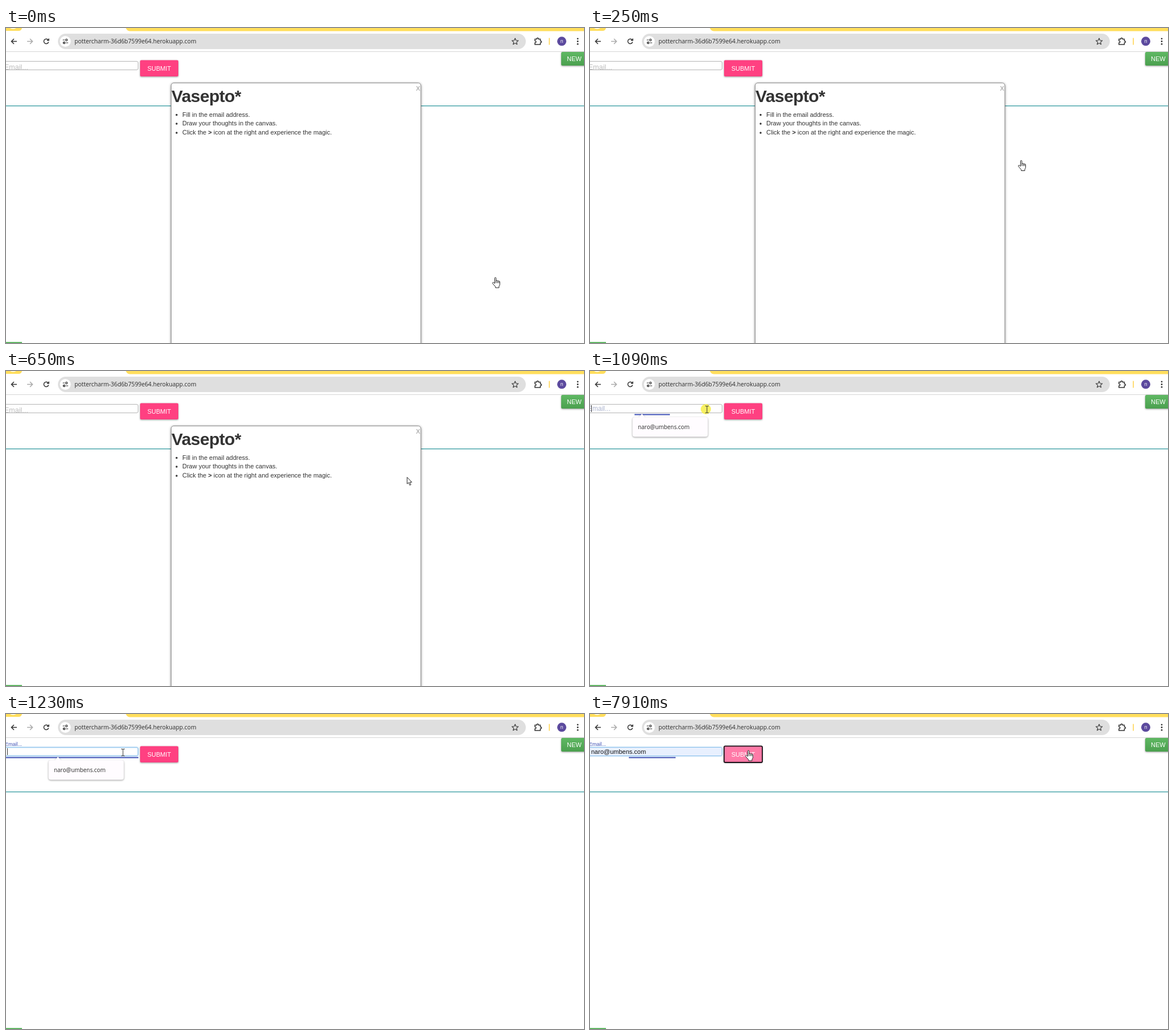
Write an HTML page that moves like this. It is 1013x553 px and loops after 8000 ms.

```html
<!DOCTYPE html>
<html lang="en">
<head>
<meta charset="utf-8">
<title>Email form</title>
<style>
  html, body { margin: 0; width: 100%; height: 100%; overflow: hidden; background: #fff; }
  svg { display: block; }
  text { font: 11px "Liberation Sans", Arial, sans-serif; fill: #333; }
  .ui { font: 10.3px "Open Sans", sans-serif; fill: #2b2b2b; }
  .white { fill: #fff; }
  .icon { fill: none; stroke: #333; stroke-width: 1.5; }
  .label { fill: #3f51b5; font-size: 9px; }
  .line { fill: #3f51b5; }
  .soft { filter: drop-shadow(0 1px 1.5px #0006); }
</style>
</head>
<body>
<svg width="1013" height="553" viewBox="0 0 1013 553">
  <defs>
    <linearGradient id="green" x2="0" y2="1">
      <stop stop-color="#5fb863"/><stop offset="1" stop-color="#4ba04f"/>
    </linearGradient>
    <clipPath id="buttonClip"><rect x="235" y="56.5" width="67" height="28.5" rx="2"/></clipPath>
    <path id="hand" fill="#fff" stroke="#222" stroke-linejoin="round"
      d="M4.5 11V1.8q0-1.3 1.2-1.3t1.2 1.3V6.5q.3-.9 1.3-.9t1.2 1.2q.3-.7 1.1-.7 1 0 1.2 1.2.3-.4.8-.4 1 0 1 1.4v4q0 2-1.5 3.6v2.6H5.8v-1.8L1.2 11.4q-1-1.6.1-2.3 1-.5 1.8.4zM6.9 6.5v3.8M9.4 6.8v3.5M11.7 7.3v3"/>
    <path id="arrow" fill="#fff" stroke="#222" stroke-linejoin="round"
      d="M.5.5v11.7l2.6-2.4 2 4.7 2-.9-2-4.4h3.7z"/>
    <path id="beam" fill="none" stroke="#333" d="M-3 .5h2l1 .8 1-.8h2M0 1v11M-3 12.5h2l1-.8 1 .8h2"/>
  </defs>

  <!-- browser bar -->
  <path fill="#ffde5c" d="M0 0H28Q27 5 22 5H0zM210 0H1013V5.5H217Q212 5 210 0z"/>
  <path fill="#fff" d="M7 0h11q-5.500 3-11 0z"/>
  <rect y="41" width="1013" height="1" fill="#d6d6d6"/>
  <rect x="91" y="10" width="820" height="27" rx="13.500" fill="#dfdfdf"/>
  <circle cx="104" cy="23.500" r="9.500" fill="#fff"/>
  <path class="icon" stroke-width="1.300" d="M19 23.500H10M14 19l-4.500 4.500L14 28"/>
  <path class="icon" style="stroke:#aaa" d="M37 23.500h9M42 19l4.500 4.500L42 28"/>
  <path class="icon" d="M74 21a4.200 4.200 0 1 0 .6 3.500M75 18.500v3.200h-3.300"/>
  <path class="icon" style="stroke-width:1.200" d="M99.500 21h3.500M105 26h4M102.500 26h-3"/>
  <g class="icon" style="stroke-width:1.200"><circle cx="106" cy="21" r="1.600"/><circle cx="102" cy="26" r="1.600"/></g>
  <text class="ui" x="120" y="27.300">pottercharm-36d6b7599e64.herokuapp.com</text>
  <path class="icon" style="stroke-width:1.100" stroke-linejoin="round"
    d="M892.300 18l1.600 3.800 4 .3-3.100 2.700 1 4-3.500-2.200-3.500 2.200 1-4-3.100-2.700 4-.3z"/>
  <path class="icon" d="M927 19.500h3.200q-.2-2 1.500-2t1.500 2h3.300v3.200q2 0 2 1.600t-2 1.600v3.100H927v-3q2-.2 2-1.700t-2-1.700z"/>
  <rect x="951.500" y="17.500" width="1.500" height="12" fill="#ffd24a"/>
  <circle cx="974" cy="23.300" r="8" fill="#5c4a9e"/>
  <text class="white" x="974" y="26" text-anchor="middle" style="font-size:8.500px">n</text>
  <g fill="#333"><circle cx="1002" cy="18.800" r="1.400"/><circle cx="1002" cy="23.500" r="1.400"/><circle cx="1002" cy="28.200" r="1.400"/></g>

  <!-- page -->
  <rect y="136" width="1013" height="1.400" fill="#40a0a6"/>
  <rect y="551.300" width="28" height="2" fill="#4caf50"/>
  <rect class="soft" x="973" y="42" width="46" height="24" rx="2.500" fill="url(#green)"/>
  <text class="white" x="983" y="58">NEW</text>

  <g fill="none">
    <rect data-to="1230" x="-5" y="58.500" width="236.500" height="15" rx="2.500" stroke="#b4b4b4"/>
    <rect data-from="1230" x="-5" y="58.500" width="236.500" height="15" rx="2.500" stroke="#83bdea"
      style="filter:drop-shadow(0 0 1.500px #66afe9aa)"/>
  </g>
  <rect data-from="1360" x="-5" y="59" width="236" height="14" rx="2" fill="#e8f0fe"/>
  <text data-to="1090" x="-3" y="72.800" style="font-size:12.500px;fill:#bcbcbc">Email...</text>
  <text data-from="1090" data-to="1230" x="-4" y="69.500" style="font-size:12px;fill:#adb5d0">Email...</text>
  <text data-from="1230" class="label" x="-2" y="56">Email...</text>
  <rect data-from="1090" data-to="1360" x="2" y="60" width="1" height="12" fill="#333"/>
  <text data-from="1360" x="2" y="69.700" style="fill:#111">naro@umbens.com</text>

  <rect class="line" data-from="1090" data-to="1230" x="78" y="75.500" width="62" height="2"/>
  <rect class="line" data-from="1230" data-to="1360" y="75.500" width="232" height="2"/>
  <rect class="line" data-from="1360" data-to="7910" x="8" y="75.500" width="211" height="2"/>
  <rect class="line" data-from="7910" x="68" y="75.500" width="82" height="2"/>

  <g data-from="1090" data-to="1360">
    <path class="soft" fill="#fffcff" d="M79 81h7l5-6 5 6h106q4.500 0 4.500 4.500v25.500q0 4.500-4.500 4.500H79q-4.500 0-4.500-4.500V85.500Q74.500 81 79 81z"/>
    <text class="ui" x="84" y="102" style="font-size:9.900px">naro@umbens.com</text>
  </g>

  <rect class="soft" x="235" y="56.500" width="67" height="28.500" rx="2" fill="#ff4081"/>
  <text class="white" x="247.700" y="74.500">SUBMIT</text>
  <g clip-path="url(#buttonClip)" fill="#fff" fill-opacity=".3">
    <circle data-from="1360" data-to="7910" cx="275" cy="69" r="25"/>
    <rect data-from="7910" x="235" y="56" width="67" height="30"/>
  </g>
  <rect data-from="1360" x="235" y="56.300" width="67" height="28.700" rx="2" fill="none" stroke="#1b1118" stroke-width="1.800"/>

  <g data-to="1090">
    <rect x="289.500" y="96.500" width="437.500" height="470" rx="4.500" fill="#fff" stroke="#8c8c8c"
      style="filter:drop-shadow(0 1px 2px #0007)"/>
    <text x="290" y="130" style="font-size:30px;font-weight:bold;letter-spacing:-.02em">Vasepto*</text>
    <text x="718.500" y="109.500" style="font-weight:bold;fill:#b5b5b5">X</text>
    <g fill="#333"><circle cx="299" cy="152.500" r="1.700"/><circle cx="299" cy="168" r="1.700"/><circle cx="299" cy="184" r="1.700"/></g>
    <text x="309" y="155.500">Fill in the email address.</text>
    <text x="309" y="171">Draw your thoughts in the canvas.</text>
    <text x="309" y="187">Click the <tspan font-weight="bold">&gt;</tspan> icon at the right and experience the magic.</text>
  </g>

  <circle data-from="1090" data-to="1230" cx="203" cy="67" r="9" fill="#f7ef48" fill-opacity=".85"/>
  <use id="cursor"/>
</svg>
<script>
  const LOOP = 8000;
  // start time, shape, x, y
  const cursorSteps = [
    [0, 'hand', 852, 437.500],
    [130, 'hand', 801, 335],
    [250, 'hand', 750, 232],
    [500, 'arrow', 755, 241],
    [650, 'arrow', 702.500, 186],
    [790, 'arrow', 698, 147],
    [940, 'arrow', 713.500, 127],
    [1090, 'beam', 205, 61],
    [1360, 'hand', 272, 63.500]
  ];
  const cursor = document.getElementById('cursor');
  const timed = document.querySelectorAll('[data-from], [data-to]');

  function draw(now) {
    const t = now % LOOP;
    for (const el of timed) {
      const { from = 0, to = LOOP } = el.dataset;
      el.style.display = t >= +from && t < +to ? '' : 'none';
    }
    const [, shape, x, y] = cursorSteps.findLast(step => t >= step[0]);
    cursor.setAttribute('href', '#' + shape);
    cursor.setAttribute('transform', `translate(${x} ${y})`);
  }

  const start = performance.now();
  function tick() {
    draw(performance.now() - start);
    requestAnimationFrame(tick);
  }
  tick();
</script>
</body>
</html>
```
